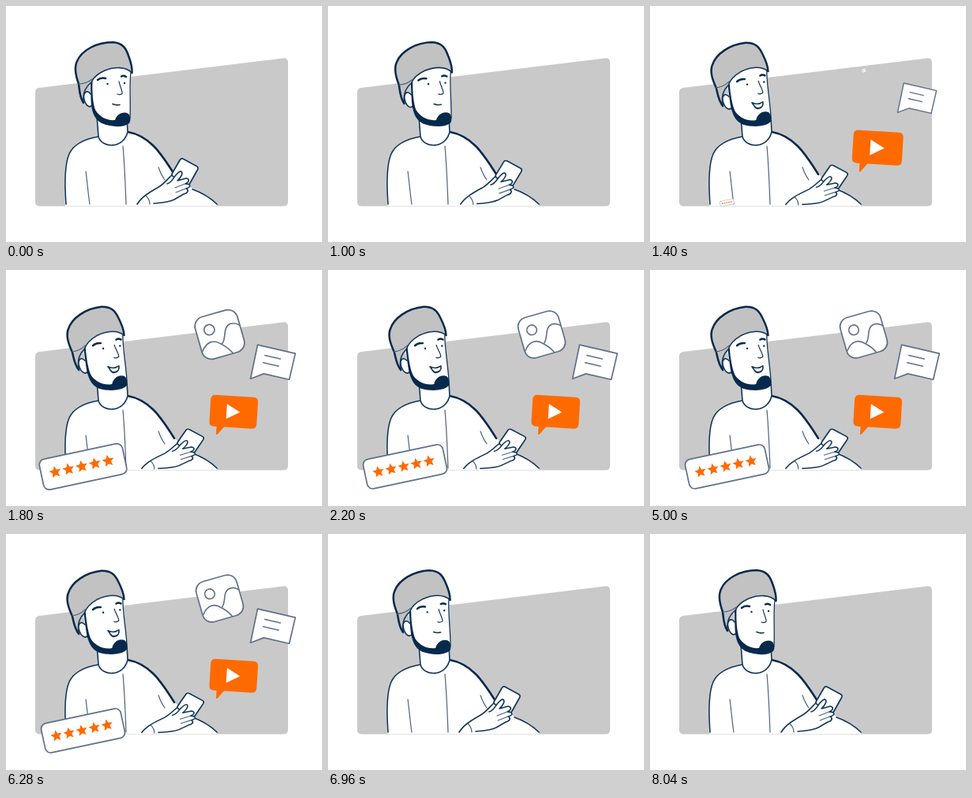
Recreate the animation shown at these times as an HTML page. Size 400 px wide and 300 px high, loop 8.16 s.

```html
<!DOCTYPE html>
<html lang="en">
<head>
<meta charset="utf-8">
<title>Man with phone</title>
<style>
  html, body { margin: 0; width: 100%; height: 100%; overflow: hidden; background: #fff; }
  svg { display: block; width: 100vw; height: 100vh; }
  .ink { fill: none; stroke: #12365a; stroke-width: 1.6; }
  .thin { fill: none; stroke: #4d647e; stroke-width: 1.2; }
  .bold { fill: none; stroke: #07294b; stroke-width: 2.5; }
  .skin { fill: #fff; }
  .gray { fill: #c9c9c9; }
  .cap { fill: #c2c2c2; }
  .dark { fill: #07294b; stroke: none; }
  .card { fill: #fff; stroke: #5f7189; stroke-width: 1.7; }
  .line { fill: none; stroke: #5f7189; stroke-width: 1.6; }
  .orange { fill: #ff6a00; }
</style>
</head>
<body>
<svg viewBox="0 0 400 300" stroke-linecap="round" stroke-linejoin="round">
  <clipPath id="floor"><rect width="400" height="254"/></clipPath>
  <path class="gray" d="M37 110 Q37 104.500 42 104 L350 66.500 Q357 65.500 357 72 V249 Q357 254.500 351 254.500 H43 Q37 254.500 37 249 Z"/>

  <g clip-path="url(#floor)">
    <!-- body -->
    <path class="skin" d="M75 255 C74 225 74 202 80 188 C86 175 100 169 117 166 L154 160 C184 166 196 186 213 214 L238 234 C250 238 259 244 267 252 V255 Z"/>
    <path class="ink" d="M76 252 C74 225 74 202 80 188 C86 175 100 169 117 166"/>
    <path class="bold" d="M154 160 C181 165 195 185 213 214"/>
    <path class="ink" d="M236 233 C250 238 259 244 267 252"/>
    <path class="thin" d="M101 210 C103 225 104 239 106 252 M148 178 C150 200 151 225 152 252 M193 205 C195 211 198 217 201 221"/>
    <path class="ink" style="fill:#fff" d="M115 140 L117 166 C121 181 149 182 154 160 L153 142"/>

    <!-- hand and phone -->
    <g id="hand">
      <path class="skin" d="M166 254 C172 242 183 236 195 229 L212 214 L233 222 L232 240 L205 256 Z"/>
      <path class="ink" d="M166 252 C172 242 183 236 195 229 C203 223 207 217 213 212"/>
      <path class="card" style="stroke:#12365a" d="M220 196 Q221.500 193 224.500 194.500 L241 203.500 Q244 205 242.500 208 L233 225 Q231.500 228 228.500 226.500 L212 217 Q209 215.500 210.500 212.500 Z"/>
      <path class="ink" style="fill:#fff" d="M204 226 C212 224 213 213 221 210 C225 212 222 217 217 222 L228 219 C233 220 232 224 227 226 C234 226 235 230 228 232 C232 234 230 238 225 239 L213 246 C205 250 196 250 187 251"/>
      <path class="thin" d="M227 226 L214 231 M228 232 L215 237 M177 241 C180 244 182 248 182 252"/>
    </g>
  </g>

  <!-- head -->
  <g id="head">
    <path class="skin" d="M106 98 L109 132 C120 150 145 154 157 146 L158 84 L125 76 Z"/>
    <path class="ink" style="stroke-width:1.300" d="M158 84 C156 99 158 120 157 143"/>
    <path class="ink" style="fill:#fff" d="M107 112 C102 105 97 111 99 119 C101 127 106 130 109 126"/>
    <path class="dark" d="M107 97 L109.500 96 C109 110 110 124 113 132 C119 142 129 146 138 145 C140 138 148 133 155 137 C158 141 158 146 156 149 C149 155 133 154 121 149 C111 144 108 132 107.500 120 Z"/>
    <path class="cap" d="M92 99 C88 88 86 78 90 70 C96 56 115 46 135 46 C148 47 152 54 155 63 C158 71 160 79 159.500 85 C152 77 138 77 125 82 C114 87 110 92 108 97 C102 102 97 108 98 123 C93 116 92 106 92 99 Z"/>
    <path class="ink" d="M159.500 85 C152 77 138 77 125 82 C114 87 110 92 108 97 C102 102 97 108 98 123"/>
    <path class="bold" d="M98 123 C93 116 93 106 92 99 C88 88 86 78 90 70 C96 56 115 46 135 46 C148 47 152 54 155 63 C158 71 160 79 159.500 85"/>
    <path class="thin" d="M92 99 C99 99 104 97 109 93"/>
    <g id="face">
      <path class="bold" d="M116 94 Q120 90.500 126 92 M146 89.500 Q149 88 152 90"/>
      <circle class="dark" cx="128.500" cy="99" r="1.200"/>
      <circle class="dark" cx="150" cy="98" r="1.200"/>
      <path class="ink" style="stroke-width:1.200" d="M143 96 C144 102 148 109 147 111.500 Q144 113.500 141 112"/>
      <path id="calm" class="ink" d="M135 124.500 Q139 126.500 144 125.500"/>
      <g id="smile">
        <path class="ink" style="fill:#fff" d="M132 122.500 Q139 127 146 123 C146 131 138 134 134.500 127 Z"/>
        <path class="dark" d="M136 128.500 Q140 130.500 144 128 Q140 133 136 128.500 Z"/>
      </g>
    </g>
  </g>

  <g id="video">
    <path class="orange" d="M-24 -20 H24 Q30 -20 30 -14 V14 Q30 20 24 20 H-11 L-19 30 Q-20.500 31 -20.500 29 V20 H-24 Q-30 20 -30 14 V-14 Q-30 -20 -24 -20 Z"/>
    <path fill="#fff" d="M-9 -9.500 L8 0 L-9 9.500 Z"/>
  </g>
  <g id="chat">
    <path class="card" d="M-25 -17 H24 V17 H-9 L-24 27 Z"/>
    <path class="line" d="M-13 -6 H7 M-13 3.500 H7"/>
  </g>
  <g id="photo">
    <rect class="card" x="-26.500" y="-26.500" width="53" height="53" rx="12"/>
    <circle class="line" cx="-10.500" cy="-9" r="6.300"/>
    <path class="line" d="M-25.500 14 C-17 3 -8 4 -1 12 C4 17 7 21 9 26 M-1 12 C7 8 5 -8 16 -9 Q22 -9 26.500 -4"/>
  </g>
  <g id="rating">
    <rect class="card" x="-51.500" y="-19" width="103" height="38" rx="7"/>
  </g>
</svg>
<script>
const LOOP = 8160, LEAVE = 6600;
const $ = id => document.getElementById(id);
const clamp = x => Math.min(1, Math.max(0, x));
const span = (t, from, dur) => clamp((t - from) / dur);
const smooth = p => p * p * (3 - 2 * p);
const backOut = p => 1 + 2.3 * (p - 1) ** 3 + 1.3 * (p - 1) ** 2;
const backIn = p => 1 - backOut(1 - p);

// Forward and back again: 0 at rest, 1 when looking at the screen
const sway = (t, a, da, b, db) => smooth(span(t, a, da)) - smooth(span(t, b, db));

const icons = [
  { id: "video", x: 288.2, y: 180.3, turn: 3.5, start: 1000 },
  { id: "chat", x: 339, y: 117.3, turn: 13, start: 1226 },
  { id: "photo", x: 270.5, y: 82, turn: -16, start: 1388 },
  { id: "rating", x: 97.5, y: 250, turn: -12, start: 1377 }
];

function star(cx, r) {
  const pts = Array.from({ length: 10 }, (_, i) => {
    const a = Math.PI * (i / 5 - 0.5), q = i % 2 ? r * 0.46 : r;
    return (cx + q * Math.cos(a)).toFixed(2) + "," + (q * Math.sin(a) - 0.5).toFixed(2);
  });
  return `<polygon class="orange" points="${pts.join(" ")}"/>`;
}
$("rating").insertAdjacentHTML("beforeend",
  [-2, -1, 0, 1, 2].map(i => star(i * 16.4 - 1.5, 7.6)).join(""));

function place(icon, t) {
  const scale = Math.max(0, backOut(span(t, icon.start, 560)) - backIn(span(t, LEAVE, 340)));
  const el = $(icon.id);
  el.setAttribute("visibility", scale > 0.005 ? "visible" : "hidden");
  el.setAttribute("transform", `translate(${icon.x} ${icon.y}) rotate(${icon.turn}) scale(${scale})`);
}

function draw(t) {
  const head = sway(t, 840, 480, 6660, 600);
  const hand = sway(t, 840, 440, LEAVE, 360);
  const smile = sway(t, 1020, 160, 6680, 160);
  $("head").setAttribute("transform", `rotate(${-6 * head} 135 180)`);
  $("face").setAttribute("transform", `translate(${3 * head} 0)`);
  $("hand").setAttribute("transform",
    `translate(${6 * hand} ${2 * hand}) translate(190 245) rotate(${2 * hand}) scale(1 ${1 - 0.1 * hand}) translate(-190 -245)`);
  $("smile").setAttribute("opacity", smile);
  $("calm").setAttribute("opacity", 1 - smile);
  icons.forEach(icon => place(icon, t));
}

const begin = performance.now();
function tick() {
  draw((performance.now() - begin) % LOOP);
  requestAnimationFrame(tick);
}
tick();
</script>
</body>
</html>
```
